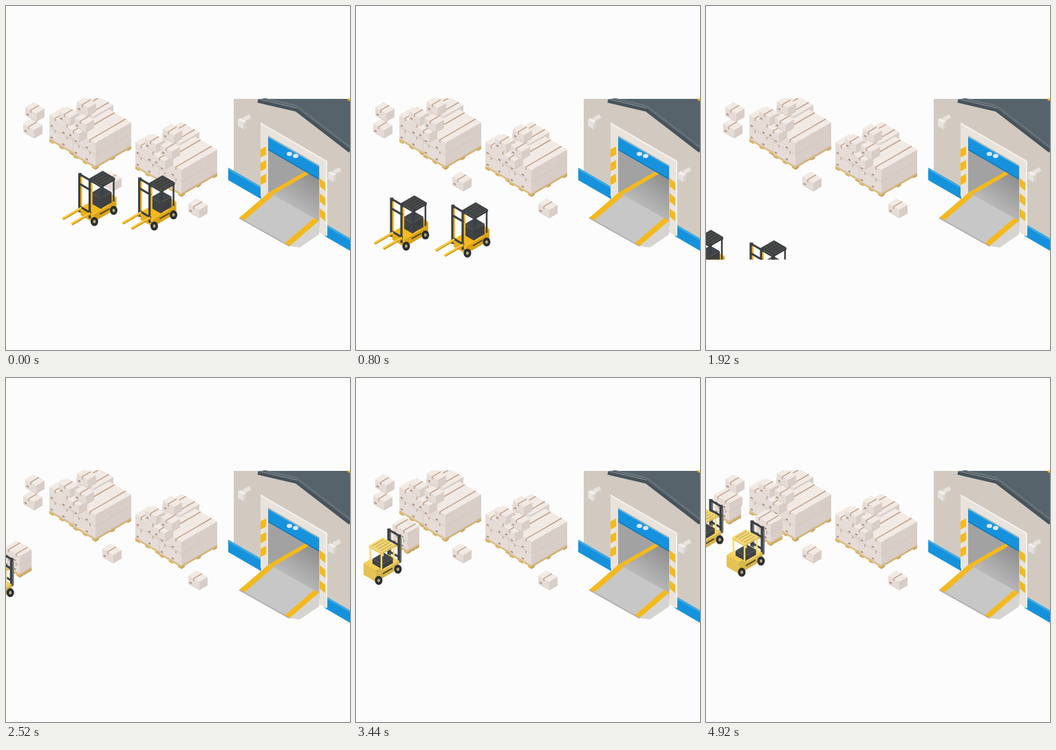
An HTML page with a canvas that plays this animation: 500x500 px, repeating every 4.96 s.

```html
<!DOCTYPE html>
<html lang="en">
<head>
<meta charset="utf-8">
<title>Warehouse loading</title>
<style>
html, body { margin: 0; width: 100%; height: 100%; overflow: hidden; background: #fcfcfc; }
canvas { display: block; filter: blur(0.5px); }
</style>
</head>
<body>
<canvas id="stage" width="500" height="500"></canvas>
<script>
const ctx = document.getElementById('stage').getContext('2d');
const LOOP = 4960, STEP = 40, SLOPE = 0.58;
const YELLOW = '#f4b91c', DARK = '#3b4044', BLUE = '#1692dc', FRAME = '#e8e3dc';

function poly(fill, ...points) {
  ctx.beginPath();
  points.forEach(p => ctx.lineTo(...p));
  ctx.closePath();
  ctx.fillStyle = fill;
  ctx.fill();
}

function line(color, width, ...points) {
  ctx.beginPath();
  points.forEach(p => ctx.lineTo(...p));
  ctx.strokeStyle = color;
  ctx.lineWidth = width;
  ctx.stroke();
}

function oval(fill, [x, y], rx, ry = rx) {
  ctx.beginPath();
  ctx.ellipse(x, y, rx, ry, 0, 0, 7);
  ctx.fillStyle = fill;
  ctx.fill();
}

function at(x, y, draw) {
  ctx.save();
  ctx.translate(x, y);
  draw();
  ctx.restore();
}

const add = (p, q, k = 1) => [p[0] + q[0] * k, p[1] + q[1] * k];

function quad(fill, p, u, v) {
  poly(fill, p, add(p, u), add(add(p, u), v), add(p, v));
}

// Isometric block; (x, y) is the bottom of its nearest edge.
function block(x, y, a, b, h, color) {
  const near = [x, y], up = [0, -h], left = [-a, -a * SLOPE], right = [b, -b * SLOPE];
  for (const fill of [color, 'rgba(40,10,0,.06)']) quad(fill, near, left, up);
  for (const fill of [color, 'rgba(40,10,0,.13)']) quad(fill, near, right, up);
  quad(color, add(near, up), left, right);
}

function carton(x, y, a = 16, b = 12, h = 12) {
  block(x, y, a, b, h, '#f2eae4');
  const mid = [x - a / 2, y - a / 2 * SLOPE - h];
  line('#c0a18b', 1.5, add(mid, [0, 4]), mid, add(mid, [b, -b * SLOPE]));
  line('#cdbfb6', 0.7, [x - a, y - a * SLOPE], [x, y], [x + b, y - b * SLOPE]);
  line('#a88d79', 2, [x - a + 2, y - a * SLOPE - 2], [x - a + 5, y - a * SLOPE]);
}

function stack(x, y, cols, rows, layers, a, b, h) {
  const width = cols * a, depth = rows * b;
  for (let i = 0; i <= 2; i++) {
    const u = i * (width - 5) / 2, v = i * (depth - 5) / 2;
    block(x - u, y + 5 - u * SLOPE, 5, 3, 4, '#dcb566');
    block(x + v, y + 5 - v * SLOPE, 3, 5, 4, '#dcb566');
  }
  block(x, y + 3, width, depth, 4, '#edcb81');
  for (let k = 0; k < layers; k++)
    for (let i = cols - 1; i >= 0; i--)
      for (let j = rows - 1; j >= 0; j--)
        carton(x - i * a + j * b, y - (i * a + j * b) * SLOPE - k * h, a, b, h);
}

function pile() {
  stack(128, 192, 2, 2, 2, 13, 14, 16);
  stack(97, 212, 2, 1, 2, 17, 20, 17);
  stack(130, 233, 2, 3, 2, 16, 17.3, 17);
  carton(93, 174);
  carton(106, 198);
  carton(116, 184);
  carton(119, 160);
}

// Points on the facade: x on screen, z above the wall's foot.
const facade = (x, z) => [x, 253 + (x - 323) * SLOPE - z];

function panel(fill, x0, x1, z0, z1, skew = 0) {
  poly(fill, facade(x0, z1), facade(x1, z1 + skew), facade(x1, z0 + skew), facade(x0, z0));
}

function lamp(x, y) {
  line(FRAME, 6, [x + 9, y - 9], [x - 1, y - 4]);
  block(x - 1, y + 10, 8, 4, 9, '#f2f0ed');
}

function roof() {
  const eave = [[366, 135], [422, 148], [500, 208]];
  poly('#56636b', ...eave, [500, 135]);
  line('#47535b', 5, ...eave.map(p => add(p, [0, 3])));
  line('#6c7981', 1.5, ...eave.map(p => add(p, [0, -3])));
  line(YELLOW, 3, [497, 135], [500, 137]);
}

function doorway(sill, along) {
  ctx.save();
  ctx.beginPath();
  [facade(381, 97), facade(455, 97), facade(455, 16), facade(381, 16)].forEach(p => ctx.lineTo(...p));
  ctx.clip();
  const shade = ctx.createLinearGradient(440, 240, 400, 295);
  shade.addColorStop(0, '#8e8e8e');
  shade.addColorStop(1, '#c2c2c2');
  panel('#a2a2a2', 381, 455, 16, 97);
  quad(shade, sill, along, [54, -31]);
  quad(YELLOW, sill, [6, 3], [54, -31]);
  ctx.restore();
  panel(BLUE, 381, 455, 78, 97);
  line('#0b78b9', 1.5, facade(381, 78), facade(455, 78));
  line('#43aee6', 1.2, facade(381, 96), facade(455, 96));
  oval('#dfe7ea', [412, 215], 4, 3);
  oval('#dfe7ea', [421, 218], 4, 3);
}

function warehouse() {
  panel('#d2cac0', 331, 500, 10, 260);
  poly('#fcfcfc', [320, 0], [320, 135], [500, 135], [500, 0]);
  roof();
  for (const [x0, x1] of [[323, 371], [463, 500]]) {
    panel(BLUE, x0, x1, 0, 18);
    panel('#3eaae4', x0, x1, 15, 18);
  }
  panel(FRAME, 370, 381, 4, 111);
  panel(FRAME, 455, 466, 1, 111);
  panel(FRAME, 370, 466, 97, 111);
  line('#f4f1ed', 2, facade(370, 110), facade(466, 110), facade(466, 2));
  line('#bcb4aa', 1, facade(381, 98), facade(455, 98), facade(455, 10));
  for (let i = 0; i < 3; i++) {
    panel(YELLOW, 370, 378, 60 - 20 * i, 72 - 20 * i, 9);
    panel(YELLOW, 456, 464, 68 - 22 * i, 80 - 22 * i, -2);
  }

  const sill = [382, 271], along = [73, 41], out = [-43, 37];
  doorway(sill, along);
  const corner = add(sill, along), foot = add(corner, out);
  poly('#d6d4d0', corner, foot, add(foot, [15, 2]), add(corner, [0, 20]));
  quad('#c7c7c8', sill, along, out);
  quad(YELLOW, sill, [7, 4], out);
  quad(YELLOW, add(corner, [-7, -4]), [7, 4], out);
  line('#b0afad', 2, add(sill, out), foot);
  lamp(346, 169);
  lamp(477, 246);
}

// heading -1 faces the lower left, +1 the upper right.
const EMPTY = { heading: -1, mast: 69, roof: 50, cab: -6, paint: YELLOW, top: DARK };
const LOADED = { heading: 1, mast: 53, roof: 42, cab: 0, paint: '#f0ce58', top: '#f5d970' };

function forklift({ heading, mast, roof, cab, paint, top }) {
  // f: forward, s: towards the viewer's right, z: up
  const at3 = (f, s, z) => [heading * f + s, (s - heading * f) * SLOPE - z];
  const part = (f0, f1, s, z0, z1, color) =>
    block(...at3(heading < 0 ? f1 : f0, s, z0), 2 * s, f1 - f0, z1 - z0, color);
  const bar = (color, width, f, s, z0, z1) => line(color, width, at3(f, s, z0), at3(f, s, z1));

  function lift() {
    for (const s of [-8, 7]) {
      bar(DARK, 5, 18, s, 12, mast);
      bar(heading < 0 ? paint : '#6a6f6c', 2.5, 18, s + 2, 14, mast - 4);
    }
    for (const z of [20, mast - 16, mast - 2])
      line(DARK, 3, at3(18, -8, z), at3(18, 8, z));
    if (heading < 0)
      for (const s of [-6, 7]) {
        line('#d39c18', 4, at3(18, s, 19), at3(45, s, 19));
        line('#ffd04a', 2, at3(18, s, 20), at3(46, s, 20));
      }
  }

  function body() {
    part(-18, 16, 9, 6, 17, paint);
    part(-18, -7, 9, 17, 23, paint);
    line('#5c4a1c', 2, at3(-8, 9, 12), at3(6, 9, 12));
    for (const f of [14, -14]) {
      oval('#2b2e31', at3(f, 9, 6), 5.5, 6.5);
      oval('#b3a67c', at3(f, 9, 6), 2, 2.5);
    }
    part(cab - 7, cab + 9, 7, 17, roof - 18, '#42474b');
    for (const s of [-8, 8])
      for (const f of [cab - 9, cab + 9]) bar(top, 2.5, f, s, 18, roof);
    part(cab - 10, cab + 10, 9, roof - 1, roof + 2, top);
    for (let s = -6; s <= 6; s += 4)
      line('rgba(120,110,80,.45)', 1.2, at3(cab - 8, s, roof + 2), at3(cab + 8, s, roof + 2));
  }

  if (heading > 0) {
    stack(37, -36, 2, 1, 2, 11, 17, 13);
    lift();
    body();
  } else {
    body();
    lift();
  }
}

function drive(x, y, vx, vy, t, model) {
  at(x + vx * t, y + vy * t, () => forklift(model));
}

function scene(t) {
  ctx.fillStyle = '#fcfcfc';
  ctx.fillRect(0, 0, 500, 500);
  ctx.save();
  ctx.beginPath();
  ctx.rect(0, 134, 500, 234.5);
  ctx.clip();
  warehouse();
  carton(41, 192);
  carton(44, 168);
  pile();
  at(125, 39.5, pile);
  carton(156, 269);
  carton(281, 308);

  drive(133.5, 306, -0.0695, 0.0447, t, EMPTY);
  drive(220.5, 312.5, -0.067, 0.0492, t, EMPTY);
  if (t > 3920) drive(-3, 244, 0.06, -0.037, t - 4920, LOADED);
  if (t > 1920) drive(57, 275, 0.0595, -0.037, Math.min(0, t - 3760), LOADED);
  ctx.restore();
}

function frame() {
  scene(Math.floor(performance.now() % LOOP / STEP) * STEP);
  requestAnimationFrame(frame);
}
frame();
</script>
</body>
</html>
```
